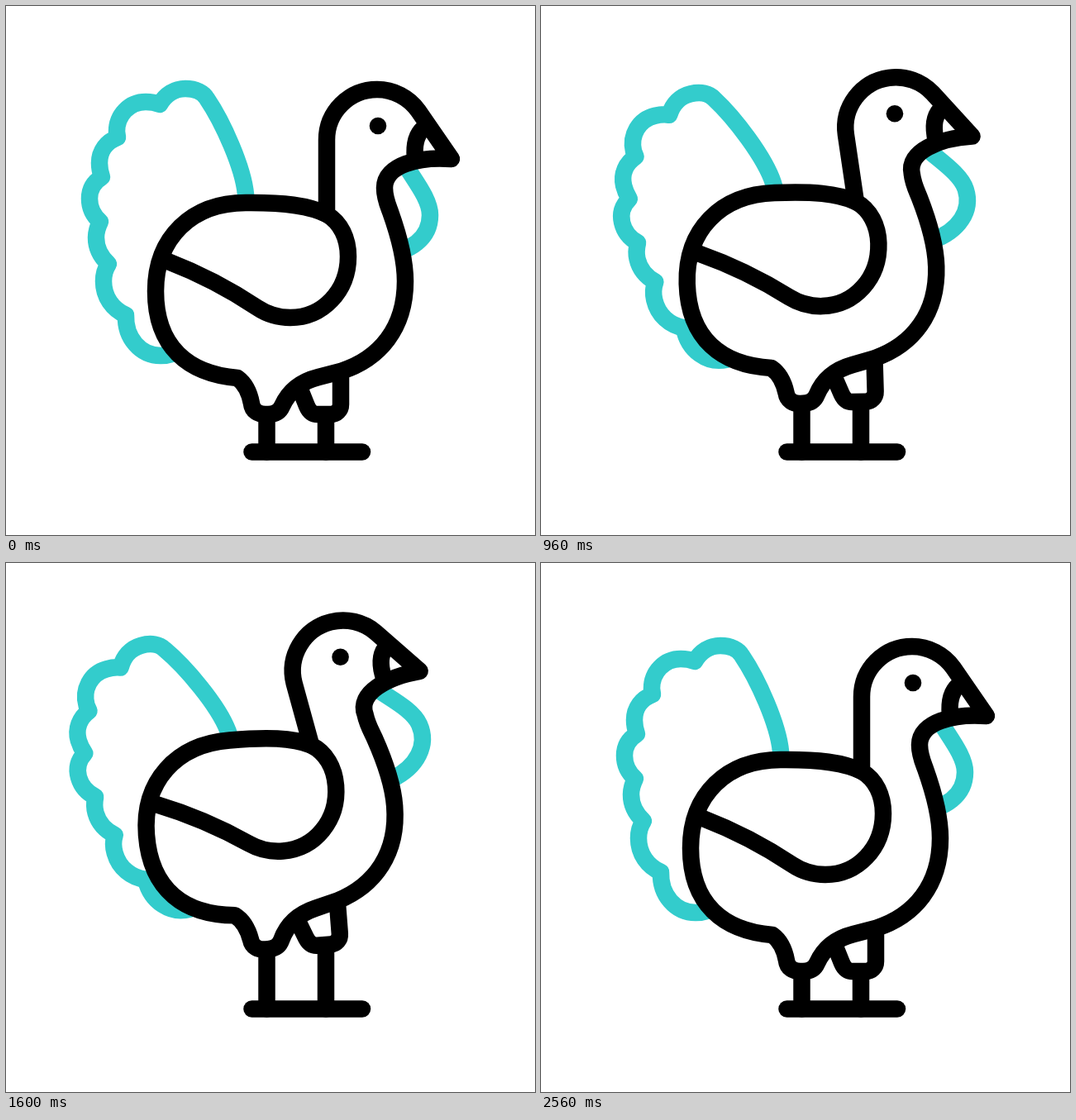
These frames come from a looping animation (640 px wide and 640 px high, 2.6 s). An HTML page with a canvas:

```html
<!DOCTYPE html>
<html lang="en">
<head>
<meta charset="utf-8">
<title>Turkey</title>
<style>
html, body { margin: 0; width: 100%; height: 100%; overflow: hidden; background: #fff; }
canvas { display: block; width: 640px; height: 640px; }
</style>
</head>
<body>
<canvas id="stage" width="640" height="640"></canvas>
<script>
const ctx = document.getElementById('stage').getContext('2d');
const LOOP = 2600;
const INK = '#000', TEAL = '#33cccc';

// Pivots in the rest pose
const HIP = [344, 495], NECK = [460, 255], TAIL = [283, 233], CHIN = [485, 195];

// Body: time, drop, lean, extra neck lean (degrees)
const bodyKeys = [
  [200, 0, 0, 0], [480, 13, 0, 0], [800, -28.8, -4.4, -9.8], [1200, 13, 3.3, 0.2],
  [1600, -28.8, -4.4, -9.8], [2000, 13, 0, 0], [2420, 0, 0, 0]
];
// Loose parts follow a little later: time, tail swing, wattle swing
const looseKeys = [
  [280, 0, 0], [560, 6, 10.6], [880, -13.5, -13.5], [1280, 6.5, 22],
  [1680, -13.5, -13.5], [2080, 6.5, 18], [2540, 0, 0]
];

const shapes = {
  body: `M388 252 L388 162 C388 128.3 415.3 101 449 101 C468.7 101 487.4 110.5 498.7 126.6
    L539 185 C500 182 458 192 458 220 C458 232 462 241 465 249 C475 277 483 305 483 333
    C483 390 452 427 405 442 L378 449 C358 454 343 464 334 484 C331 491 325 494 317 494
    L314 494 C305 494 298 490 297 481 C295 470 291 458 280 450 C220 445 181 412 181 345
    C181 280 225 238 290 238 C335 237.5 366 241 388 252 Z`,
  wing: `M388 252 C405 262 414 281 414 303 C414 345 383 377 344 377
    C330 377 316 373 304 365 C268 341 235 324 196 309`,
  mouth: 'M505 148 C498 154 493 165 495 185',
  thigh: `M405 442 L405 482 C405 489 400 494 393 494 L377 494
    C371 494 367 491 364 484 L356 464`,
  tail: `M291 246 L290 228 C287 195 262 140 243 112 C239 105 230 100 217 100
    C204 100 193 107 186 119 C181 117 175 116 169 116 C149 116 134 132 134 152 L135 159
    C122 164 113 175 113 190 C113 196 114 201 116 207 C106 213 101 222 101 233
    C101 245 106 254 114 261 C111 267 109 273 109 280 C109 292 114 303 124 312
    C120 318 118 326 118 333 C118 352 129 367 145 374 C144 402 163 423 187 423
    C198 423 208 420 222 412`,
  wattle: 'M482 190 C490 206 513 232 513 253 C513 280 490 299 455 300'
};

for (const name in shapes) {
  shapes[name] = shapes[name].match(/[MLCZ][^MLCZ]*/g).map(part => {
    const n = (part.match(/[\d.]+/g) || []).map(Number);
    const pts = [];
    for (let i = 0; i < n.length; i += 2) pts.push([n[i], n[i + 1]]);
    return { cmd: part[0], pts };
  });
}

const methods = { M: 'moveTo', L: 'lineTo', C: 'bezierCurveTo', Z: 'closePath' };

const smooth = x => {
  const k = Math.min(1, Math.max(0, x));
  return k * k * (3 - 2 * k);
};

function pose(keys, t) {
  let i = 0;
  while (i < keys.length - 2 && t >= keys[i + 1][0]) i++;
  const a = keys[i], b = keys[i + 1];
  const k = smooth((t - a[0]) / (b[0] - a[0]));
  return a.slice(1).map((v, j) => v + (b[j + 1] - v) * k);
}

function turn([x, y], [px, py], deg) {
  const r = deg * Math.PI / 180, c = Math.cos(r), s = Math.sin(r);
  const dx = x - px, dy = y - py;
  return [px + dx * c - dy * s, py + dx * s + dy * c];
}

function draw(name, move, color, fill) {
  ctx.beginPath();
  for (const { cmd, pts } of shapes[name]) ctx[methods[cmd]](...pts.flatMap(move));
  if (fill) {
    ctx.fillStyle = '#fff';
    ctx.fill();
  }
  ctx.strokeStyle = color;
  ctx.stroke();
}

function line(x1, y1, x2, y2) {
  ctx.beginPath();
  ctx.moveTo(x1, y1);
  ctx.lineTo(x2, y2);
  ctx.strokeStyle = INK;
  ctx.stroke();
}

function render(t) {
  const [drop, lean, nod] = pose(bodyKeys, t);
  const [tailSwing, wattleSwing] = pose(looseKeys, t);

  const torso = p => {
    const [x, y] = turn(p, HIP, lean);
    return [x, y + drop];
  };
  const head = p => torso(turn(p, NECK, nod));
  // The neck bends gradually between torso and head
  const bend = p => torso(turn(p, NECK, nod * smooth((242 - p[1]) / 58)));

  ctx.fillStyle = '#fff';
  ctx.fillRect(0, 0, 640, 640);
  ctx.lineWidth = 20.5;
  ctx.lineCap = ctx.lineJoin = 'round';

  draw('tail', p => torso(turn(p, TAIL, tailSwing)), TEAL);
  draw('wattle', p => head(turn(p, CHIN, wattleSwing)), TEAL);

  line(315.5, 466, 315.5, 539.5);
  line(387, 466, 387, 539.5);
  line(297.5, 539.5, 431, 539.5);

  draw('thigh', torso, INK, true);
  draw('body', bend, INK, true);
  draw('wing', torso, INK);
  draw('mouth', head, INK);

  ctx.beginPath();
  ctx.arc(...head([450, 145]), 10.3, 0, Math.PI * 2);
  ctx.fillStyle = INK;
  ctx.fill();
}

const start = performance.now();
function frame() {
  render((performance.now() - start) % LOOP);
  requestAnimationFrame(frame);
}
render(0);
requestAnimationFrame(frame);
</script>
</body>
</html>
```
